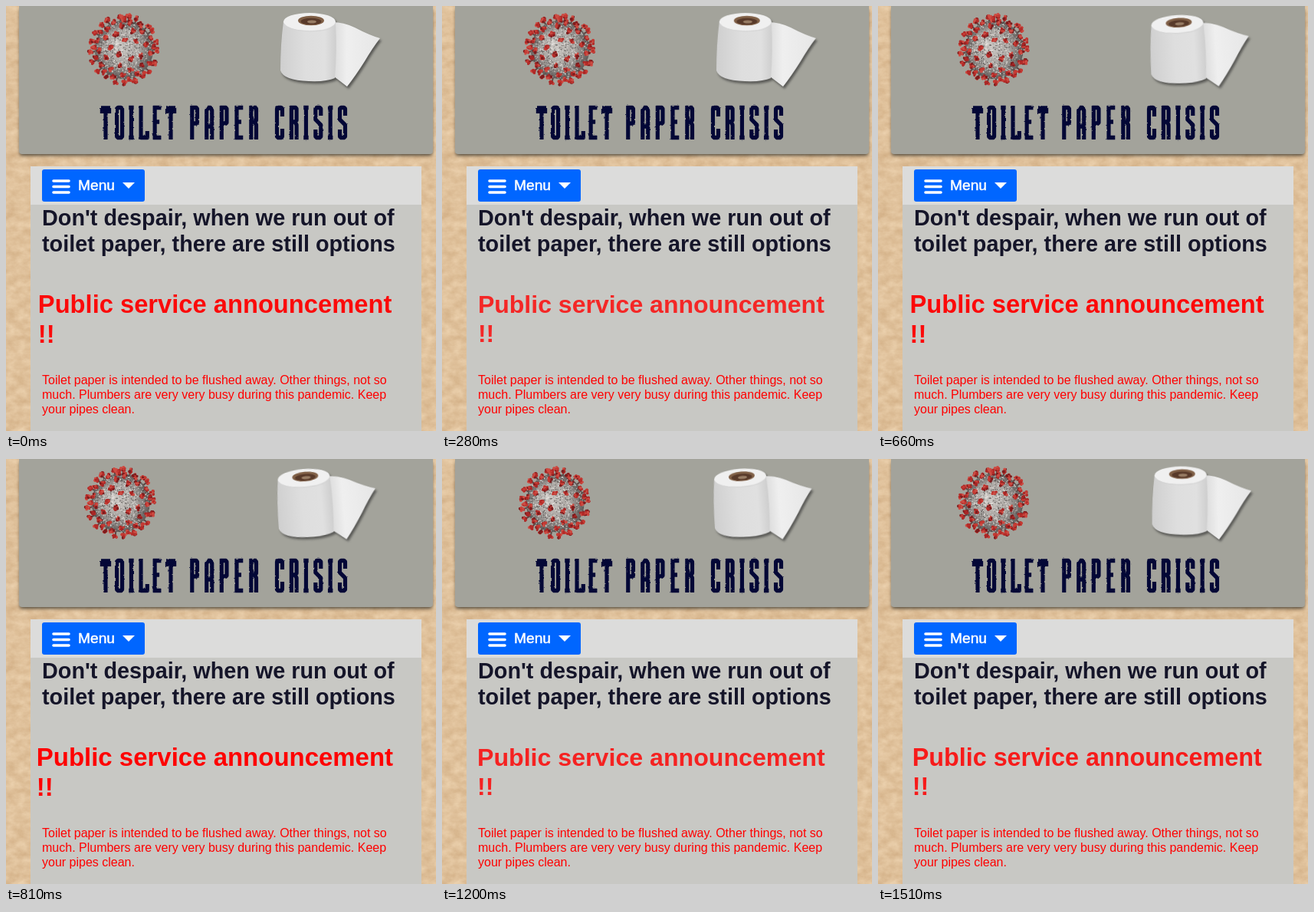
Write an HTML page with a canvas that moves like this. It is 561x554 px and loops after 1.58 s.

```html
<!DOCTYPE html>
<html lang="en">
<head>
<meta charset="utf-8">
<title>Toilet Paper Crisis</title>
<style>
  html, body { margin: 0; width: 100%; height: 100%; overflow: hidden; background: #dfc19b; }
  #stage { position: relative; width: 561px; height: 554px; overflow: hidden;
    font-family: "Liberation Sans", Arial, sans-serif; }
  #stage > * { position: absolute; margin: 0; white-space: pre; }
  .paper { left: 0; top: 0; }
  .header { left: 17px; top: 0; width: 540px; height: 193px; background: #a3a39b;
    border-radius: 0 0 4px 4px; box-shadow: 0 3px 4px -1px rgba(40, 40, 35, .75); }
  .panel { left: 32px; top: 209px; width: 510px; height: 345px; background: #c8c8c4; }
  .bar { left: 32px; top: 209px; width: 510px; height: 50px; background: #dcdcdb; }
  .button { left: 47px; top: 213px; width: 134px; height: 42px; border-radius: 3px; background: #0066ff; }
  .menu { left: 94px; top: 222px; font-size: 19.2px; line-height: 23px; color: #fff;
    -webkit-text-stroke: .5px #fff; }
  h2 { left: 47px; top: 259px; font-size: 28.8px; line-height: 34px; color: #151529; }
  h1 { left: 47px; top: 370px; width: 480px; font-size: 32px; line-height: 38px; color: #f00; }
  p { left: 47px; top: 478px; font-size: 16px; line-height: 19px; color: #f00; }
  #virus { left: 104px; top: 7px; width: 100px; height: 100px; transform-origin: 50px 106px; }
  .art { left: 0; top: 0; }
  #roll { transform-origin: 440px 112px; filter: drop-shadow(2px 3px 1.5px rgba(40, 40, 40, .6)); }
</style>
</head>
<body>
<div id="stage">
  <svg class="paper" width="561" height="554">
    <filter id="grain" x="0" y="0" width="1" height="1" color-interpolation-filters="sRGB">
      <feTurbulence type="fractalNoise" baseFrequency=".07 .1" numOctaves="4" seed="8"/>
      <feColorMatrix values=".12 0 0 0 .815  .16 0 0 0 .675  .19 0 0 0 .51  0 0 0 0 1"/>
    </filter>
    <rect width="561" height="554" filter="url(#grain)"/>
  </svg>
  <div class="header"></div>
  <div class="panel"></div>
  <div class="bar"></div>
  <div class="button"></div>
  <canvas id="virus" width="200" height="200"></canvas>
  <svg class="art" width="561" height="554">
    <defs>
      <linearGradient id="side">
        <stop offset="0" stop-color="#cfcfcf"/>
        <stop offset=".45" stop-color="#dedede"/>
        <stop offset=".8" stop-color="#e0e0e0"/>
        <stop offset="1" stop-color="#cecece"/>
      </linearGradient>
      <linearGradient id="flap">
        <stop offset="0" stop-color="#dadada"/>
        <stop offset=".3" stop-color="#efefef"/>
        <stop offset="1" stop-color="#e6e6e6"/>
      </linearGradient>
      <filter id="rough" x="-5%" y="-10%" width="110%" height="120%" color-interpolation-filters="sRGB">
        <feTurbulence type="fractalNoise" baseFrequency=".2" numOctaves="2" seed="5"/>
        <feDisplacementMap in="SourceGraphic" scale="2.2" xChannelSelector="R" yChannelSelector="G"/>
      </filter>
    </defs>
    <g id="roll">
      <path fill="url(#flap)" d="M426 21Q440 21 455 28Q474 38 488 42Q478 55 468 72Q456 91 445 105Q436 98 428 92Z"/>
      <path fill="url(#side)" d="M362 20Q358 50 358 84Q362 97 395 98Q418 99 429 94Q432 60 430 22Z"/>
      <ellipse cx="396" cy="20.5" rx="34" ry="11.5" fill="#f0f0f0"/>
      <path fill="none" stroke="#d3d3d3" stroke-width=".8" d="M362 22Q367 32 396 33Q425 33 430 24"/>
      <ellipse cx="398" cy="19" rx="17" ry="6.3" fill="#806047"/>
      <ellipse cx="398" cy="20" rx="13.5" ry="4.3" fill="#583a2a"/>
      <ellipse cx="399" cy="20.5" rx="6" ry="2" fill="#987d65"/>
    </g>
    <g id="title" role="img" aria-label="TOILET PAPER CRISIS" filter="url(#rough)"
       fill="none" stroke="#030736" stroke-width="5.6" stroke-linejoin="round"></g>
    <path stroke="#fff" stroke-width="3.6" stroke-linecap="round" d="M62 228H82M62 235.5H82M62 243H82"/>
    <path fill="#fff" d="M152 230H168L160 238Z"/>
  </svg>
  <div class="menu">Menu</div>
  <h2>Don't despair, when we run out of
toilet paper, there are still options</h2>
  <h1 id="notice">Public service announcement
!!</h1>
  <p>Toilet paper is intended to be flushed away. Other things, not so
much. Plumbers are very very busy during this pandemic. Keep
your pipes clean.</p>
</div>
<script>
const $ = id => document.getElementById(id);

// Title lettering: centre lines on a 13 x 44 cell
const glyphs = {
  T: 'M0 3H13M1.5 3V10M11.5 3V10M6.5 1V44',
  O: 'M2.7 4L4.5 2.5H8.5L10.3 4V40L8.5 41.5H4.5L2.7 40Z',
  I: 'M3.5 0V44M0 2.5H7M0 41.5H7',
  L: 'M3.5 0V41.5H12.5V33',
  E: 'M3.5 0V44M1 2.5H12.5M3 21H10M1 41.5H12.5',
  P: 'M3 0V44M1 2.5H9L10.3 4V22L9 23H3',
  A: 'M2.7 44V6L5 2.5H8L10.3 6V44M3 27H10',
  R: 'M3 0V44M1 2.5H9L10.3 4V19L8 21H3M8 21L10.3 25V44',
  C: 'M10.3 14V4L8.5 2.5H4.5L2.7 4V40L4.5 41.5H8.5L10.3 40V30',
  S: 'M10.3 13V4L8.5 2.5H4.5L2.7 4V18L10.3 25V40L8.5 41.5H4.5L2.7 40V31'
};
const squeeze = .92;
const cell = c => squeeze * (c === 'I' ? 7 : 13);

function drawWord(word, left, right) {
  const total = [...word].reduce((sum, c) => sum + cell(c), 0);
  const gap = (right - left - total) / (word.length - 1);
  let x = left;
  for (const c of word) {
    const path = document.createElementNS('http://www.w3.org/2000/svg', 'path');
    path.setAttribute('d', glyphs[c]);
    path.setAttribute('transform', `translate(${x} 130) scale(${squeeze} 1)`);
    $('title').append(path);
    x += cell(c) + gap;
  }
}
drawWord('TOILET', 124, 221);
drawWord('PAPER', 240, 329);
drawWord('CRISIS', 351, 445);

function seeded(seed) {
  return () => (seed = (seed * 16807) % 2147483647) / 2147483647;
}

function drawVirus() {
  const g = $('virus').getContext('2d');
  const rnd = seeded(71);
  const pick = list => list[Math.floor(rnd() * list.length)];
  const dot = (x, y, r, color) => {
    g.fillStyle = color;
    g.beginPath();
    g.arc(x, y, r, 0, 2 * Math.PI);
    g.fill();
  };
  const reds = ['#b32b28', '#c43a33', '#a82625', '#cc4c43', '#7d1c1d'];
  const spike = (x, y, base, tip) => {
    g.strokeStyle = '#5e4543';
    g.lineWidth = 2;
    g.beginPath();
    g.moveTo(x * base, y * base);
    g.lineTo(x * tip, y * tip);
    g.stroke();
    for (let i = 0; i < 11; i++) {
      const a = rnd() * 2 * Math.PI, d = rnd() * 3.3;
      dot(x * tip + d * Math.cos(a), y * tip + d * Math.sin(a), 1.2 + rnd(), pick(reds));
    }
  };

  g.scale(2, 2);
  g.translate(50, 50);
  for (let i = 0; i < 21; i++) {
    const a = (i + rnd() * .4) * Math.PI / 10.5;
    spike(Math.cos(a), Math.sin(a), 34, 43 + rnd() * 1.5);
  }
  const shade = g.createRadialGradient(-6, -6, 4, 0, 0, 38);
  shade.addColorStop(0, '#c8c4c0');
  shade.addColorStop(.6, '#a29e9a');
  shade.addColorStop(1, '#5f5957');
  dot(0, 0, 38, shade);
  for (let i = 0; i < 1100; i++) {
    const a = rnd() * 2 * Math.PI, r = 37.5 * Math.sqrt(rnd());
    dot(r * Math.cos(a), r * Math.sin(a), .4 + rnd() * .6,
      pick(['#e5e2deaa', '#f0edea99', '#6b666499', '#453f3e99']));
  }
  for (let i = 38; i >= 1; i--) {
    const z = 1 - i / 40, r = Math.sqrt(1 - z * z), a = i * 2.39996;
    spike(r * Math.cos(a), r * Math.sin(a), 36, 40);
  }
}
drawVirus();

const LOOP = 1580;
const steps = [0, 70, 140, 210, 280, 350, 430, 510, 580, 660, 740, 810, 890, 960,
  1040, 1120, 1200, 1280, 1350, 1430, 1510];

// [time, amount of lean]
const virusLean = [[0, 0], [140, -.04], [280, 0], [660, .38], [810, .65], [1040, 1],
  [1120, 1.03], [1350, .86], [1510, .43], [1580, .2]];
const rollLean = [[0, 0], [140, -.04], [280, .02], [660, .58], [810, .8], [1000, 1],
  [1040, 1], [1350, .5], [1510, .13], [1580, 0]];

function at(keys, t) {
  const i = keys.findIndex(k => k[0] > t);
  const [t0, a] = keys[i - 1], [t1, b] = keys[i];
  return a + (b - a) * (t - t0) / (t1 - t0);
}

function render(time) {
  const now = time % LOOP;
  const t = steps.findLast(s => s <= now);
  const pulse = (1 - Math.cos((t - 322) / 500 * Math.PI)) / 2;
  $('notice').style.transform = `scale(${1 + .03 * pulse})`;
  $('notice').style.opacity = .8 + .2 * pulse;
  $('virus').style.transform = `rotate(${-6.8 * at(virusLean, t)}deg)`;
  $('roll').style.transform = `rotate(${-6 * at(rollLean, t)}deg)`;
}

let start;
function tick(now) {
  start ??= now;
  render(now - start);
  requestAnimationFrame(tick);
}
render(0);
requestAnimationFrame(tick);
</script>
</body>
</html>
```
